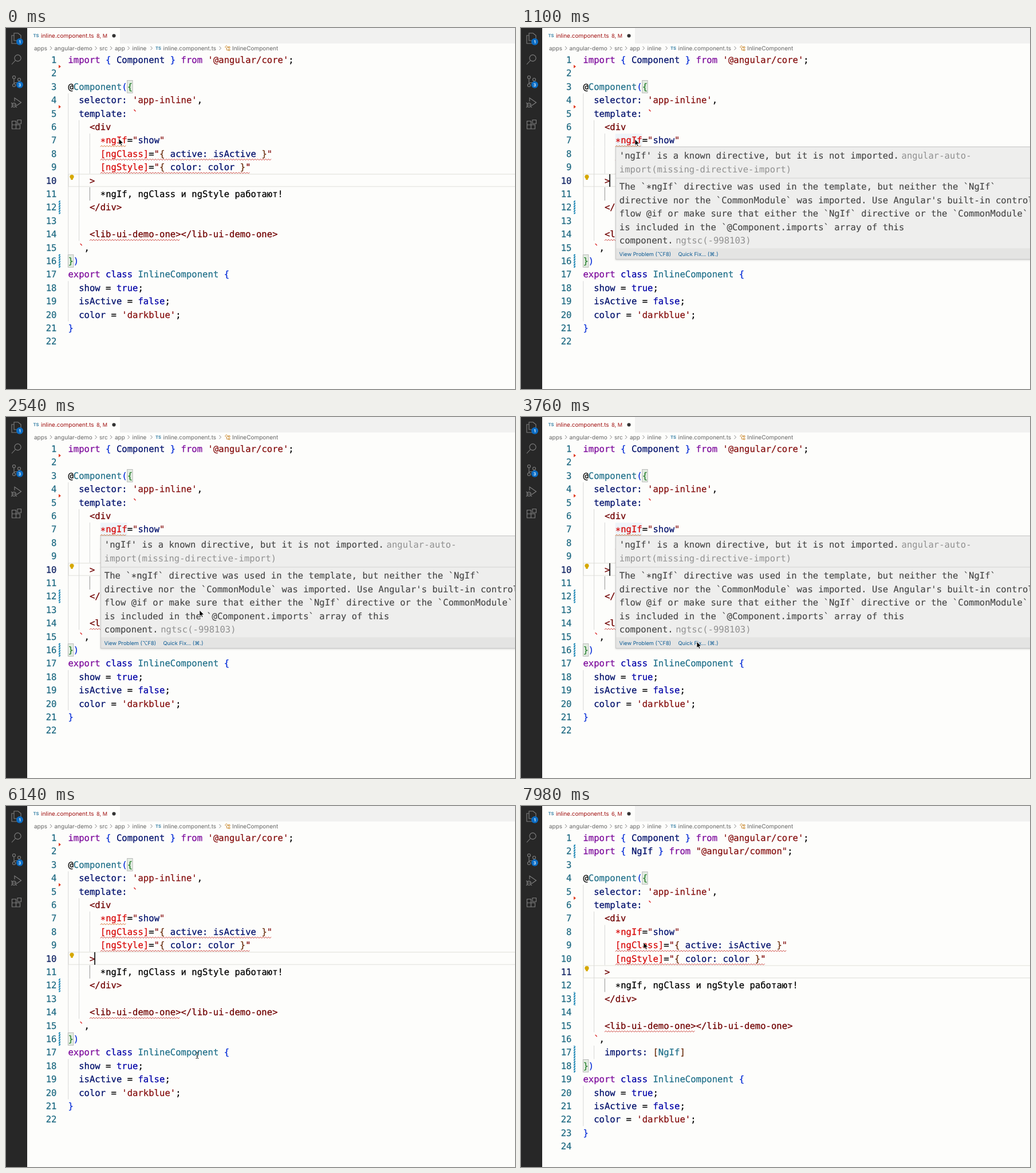
An HTML page that plays this animation: 889x630 px, repeating every 8 s.

```html
<!DOCTYPE html>
<html lang="en">
<head>
<meta charset="utf-8">
<title>Quick fix in a code editor</title>
<style>
  html, body { margin: 0; width: 100%; height: 100%; overflow: hidden; background: #fdfdfb; }
  svg { display: block; width: 100%; height: 100%; }
  text { white-space: pre; text-rendering: geometricPrecision; }
  .code { font: 15.6px "DejaVu Sans Mono", monospace; }
  .code tspan { fill: currentColor; stroke: currentColor; stroke-width: .25; }
  .ui { font: 10px Inter, sans-serif; }
  .k { color: #7d0a9c } .v { color: #00106c } .s { color: #861010 } .t { color: #20708a }
  .b { color: #0a30d8 } .g { color: #2a8030 } .m { color: #700000 } .r { color: #d80a0a }
  .n { color: #0000a8 } .o { color: #6c3010 } .x { color: #000 }
  .num { color: #1e6a82 } .num.now { color: #0b1f60 }
  .icon { fill: none; stroke: #808080; stroke-width: 1.1; }
  .code .dim { color: #909090; stroke: none } .code .doc { color: #444; stroke-width: .12 }
</style>
</head>
<body>
<svg viewBox="0 0 889 630" xml:space="preserve">
  <defs>
    <pattern id="stripes" width="3" height="3" patternUnits="userSpaceOnUse" patternTransform="rotate(-45)">
      <rect width="3" height="2.1" fill="#1b86b4"/>
    </pattern>
    <filter id="shadow" x="-10%" y="-10%" width="120%" height="130%">
      <feDropShadow dx="0" dy="1" stdDeviation="1.8" flood-opacity=".18"/>
    </filter>
    <g id="bulb" fill="#d6a800">
      <circle r="3.6"/><path d="M-1.8 2.3H1.8V5.4H-1.8Z"/>
    </g>
  </defs>

  <rect width="889" height="630" fill="#fdfdfb"/>
  <rect x="37" width="852" height="27" fill="#f1f1f0"/>
  <rect x="37" width="162" height="27" fill="#fdfdfb"/>
  <rect width="37" height="630" fill="#272727"/>

  <g class="icon">
    <path d="M14 9H21L26 13V22H14ZM14 13H10V27H20V22"/>
    <circle cx="20.5" cy="52.5" r="5.6"/><path d="M16.5 56.5L10 63.5"/>
    <circle cx="14" cy="86" r="2.5"/><circle cx="14" cy="100" r="2.5"/><circle cx="23" cy="90" r="2.5"/>
    <path d="M14 88.5V97.5M23 92.5Q23 95.5 19 95.5H16Q14 95.5 14 97.5"/>
    <path d="M15 128V122L26.5 130L18.5 135.5"/><circle cx="14" cy="134.5" r="3.4"/>
    <path d="M10.6 134.5H17.4M9 130.5L11.5 132M9 138.5L11.5 137M19 138.5L16.5 137"/>
    <path d="M10.5 162.5H17.5V176H10.5ZM10.5 169H24.5V176H17.5M20 160.5H26.5V167H20Z"/>
  </g>
  <g fill="#0a6cc4"><circle cx="24" cy="24" r="6"/><circle cx="24" cy="99" r="6"/></g>
  <g class="ui" fill="#fff" text-anchor="middle" style="font-size:7.5px;font-weight:600">
    <text x="24" y="26.8">1</text><text x="24" y="101.8">3</text>
  </g>

  <g class="ui" fill="#a01010">
    <text x="61" y="16.7">inline.component.ts</text>
    <text id="problems" x="158" y="16.7" style="font-size:9.2px"></text>
  </g>
  <circle cx="188.5" cy="13.5" r="3.1" fill="#333"/>
  <g class="ui" fill="#3b83a8" style="font-size:7.6px;font-weight:700">
    <text x="47.5" y="16.2">TS</text><text x="261" y="38.2">TS</text>
  </g>
  <g id="crumbs" class="ui" fill="#666"></g>
  <path d="M382.5 33L385 30.8L387.5 33.2L385 35.5ZM385.5 35V38.5H388.5M387 33.8H388.5M388.5 32.7H391V35H388.5ZM388.5 37.2H391V39.4H388.5Z" fill="none" stroke="#c98528" stroke-width=".9"/>

  <rect id="mark" y="184.5" height="22.5"/>
  <g id="before"></g>
  <g id="after"></g>
  <rect id="caret" x="154.3" width="1.6" height="22" fill="#000"/>

  <g id="hover">
    <rect x="165.5" y="207.5" width="740" height="196" fill="#eeeeed" stroke="#c8c8c8" filter="url(#shadow)"/>
    <rect x="166" y="384.5" width="740" height="18.5" fill="#e4e4e3"/>
    <path d="M166 262H889" stroke="#d2d2d2"/>
    <g id="message" class="code"></g>
    <g class="ui" fill="#0a5a94" style="font-size:9.3px">
      <text x="171.5" y="397.8">View Problem (⌥F8)</text><text x="274.5" y="397.8">Quick Fix... (⌘.)</text>
    </g>
  </g>

  <g id="menu">
    <rect x="275" y="404" width="148" height="45.5" rx="4" fill="#eeeeed" stroke="#c4c4c4" stroke-width=".8" filter="url(#shadow)"/>
    <text class="ui" x="286" y="420.3" fill="#747474" style="font-size:9.4px;font-weight:600">Quick Fix</text>
    <rect x="278.5" y="427.5" width="141" height="18.5" rx="2.5" fill="#0054b4"/>
    <use href="#bulb" x="293" y="435.5"/>
    <text class="ui" x="305" y="440.4" fill="#fff" style="font-size:9.8px;font-weight:500">Import NgIf (Angular)</text>
  </g>

  <g id="pointer">
    <path id="arrow" d="M0 0V11L2.5 8.8L4.2 12.6L6 11.8L4.3 8H7.8Z" fill="#000" stroke="#fff" stroke-width=".8"/>
    <path id="beam" d="M-2.5 -5.5Q0 -5.5 0 -4Q0 -5.5 2.5 -5.5M0 -4V4M-2.5 5.5Q0 5.5 0 4Q0 5.5 2.5 5.5M-1.5 1.5H1.5" fill="none" stroke="#222"/>
  </g>
</svg>
<script>
const $ = id => document.getElementById(id);
const CHAR = 9.392, LEFT = 108.4, ROW = 23.4;
const colX = col => LEFT + col * CHAR;
const rowY = row => 55.5 + (row - 1) * ROW;

// Tokens are separated by "~"; the first letter of each is its colour class.
const before = [
  "kimport~b { ~vComponent~b } ~kfrom~s '@angular/core'~x;",
  "",
  "x@~tComponent~b(~g{",
  "v  selector: ~s'app-inline'~x,",
  "v  template: ~r`",
  "m    <div",
  "r      *ngIf~x=~s\"~vshow~s\"",
  "r      [ngClass]~x=~s\"~o{ ~vactive: isActive ~o}~s\"",
  "r      [ngStyle]~x=~s\"~o{ ~vcolor: color ~o}~s\"",
  "m    >",
  "x      *ngIf, ngClass и ngStyle работают!",
  "m    </div>",
  "",
  "m    <lib-ui-demo-one></lib-ui-demo-one>",
  "r  `~x,",
  "g}~b)",
  "kexport ~nclass ~tInlineComponent ~b{",
  "v  show ~x= ~ntrue~x;",
  "v  isActive ~x= ~nfalse~x;",
  "v  color ~x= ~s'darkblue'~x;",
  "b}",
  ""
];
const after = [...before];
after.splice(1, 0, "kimport~b { ~vNgIf~b } ~kfrom~s \"@angular/common\"~x;");
after.splice(16, 0, "v    imports: ~o[~tNgIf~o]");

const escapeText = s => s.replace(/&/g, "&amp;").replace(/</g, "&lt;");
// The asterisk sits at mid-height.
const glyphs = s => escapeText(s).replace(/\*(.)/, '<tspan dy="2.3">*</tspan><tspan dy="-2.3">$1</tspan>');
const tokens = line => line.split("~").filter(Boolean)
  .map(p => `<tspan class="${p[0]}">${glyphs(p.slice(1))}</tspan>`).join("");
const plain = line => line.split("~").map(p => p.slice(1)).join("");

function squiggle(row, col, length, color, cls = "") {
  const y = rowY(row) + 10.3, end = colX(col + length);
  let d = "", up = false;
  for (let x = colX(col); x <= end; x += 2.35, up = !up)
    d += `${d ? "L" : "M"}${x.toFixed(2)} ${(y + (up ? -1 : 1)).toFixed(2)}`;
  return `<path class="${cls}" d="${d}" fill="none" stroke="${color}" stroke-width=".9"/>`;
}

function bracketBox(row, col) {
  return `<rect x="${colX(col)}" y="${rowY(row) - 10.8}" width="${CHAR}" height="21.8" fill="#e3ede2" stroke="#b9b9b9"/>`;
}

function buildEditor(lines, changedRows, deletedBelow) {
  const texts = lines.map(plain);
  const indent = i => texts[i] ? texts[i].search(/\S/)
    : Math.min(...[i - 1, i + 1].map(j => texts[j] ? texts[j].search(/\S/) : 0));
  let out = "";
  texts.forEach((text, i) => {
    const row = i + 1, y = rowY(row), current = text === "    >";
    if (current) out += `<rect x="109" y="${y - 11}" width="800" height="21.5" fill="none" stroke="#e9e9e4" stroke-width="1.5"/>`;
    for (let col = 0; col < indent(i); col += 2) {
      const active = col === 4 && text.includes("ngStyle р");
      out += `<path d="M${colX(col) + .4} ${y - ROW / 2}v${ROW}" stroke="${active ? "#939393" : "#d6d6d6"}"/>`;
    }
    if (text.endsWith("({")) out += bracketBox(row, text.length - 1);
    if (text.startsWith("})")) out += bracketBox(row, 0);
    out += `<text class="code" x="${LEFT}" y="${y + 5.5}">${tokens(lines[i])}</text>`;
    out += `<text class="code" x="88.5" y="${y + 5.5}" text-anchor="end"><tspan class="num${current ? " now" : ""}">${row}</tspan></text>`;
    const error = text.match(/\[ng\w+\]=.*|<lib-ui-demo-one>/);
    if (error) out += squiggle(row, error.index, error[0].length, "#c8302a");
    if (text.includes("*ngIf=")) out += squiggle(row, 6, 5, "#d6641e", "missing");
    if (current) out += `<use href="#bulb" x="115" y="${y - 6.6}"/>`;
  });
  for (const row of changedRows)
    out += `<rect x="92" y="${rowY(row) - ROW / 2}" width="3" height="${ROW}" fill="url(#stripes)"/>`;
  for (const row of deletedBelow)
    out += `<path d="M92 ${rowY(row + .5) - 3}l4 3l-4 3z" fill="#e03a1e"/>`;
  return out;
}

$("before").innerHTML = buildEditor(before, [12, 16], [1, 4]);
$("after").innerHTML = buildEditor(after, [2, 13, 17, 18], [5]);

$("crumbs").innerHTML =
  [[49, "apps"], [84.5, "angular-demo"], [163, "src"], [190, "app"], [220.5, "inline"],
   [274.5, "inline.component.ts"], [395, "InlineComponent"]]
    .map(([x, s]) => `<text x="${x}" y="38.7">${s}</text>`).join("") +
  [77, 155.5, 182, 212.5, 252.5, 372.5]
    .map(x => `<path d="M${x} 32l3 3.2l-3 3.2" fill="none" stroke="#858585"/>`).join("");

$("message").innerHTML = [
  [223, "'ngIf' is a known directive, but it is not imported.", "angular-auto-"],
  [246.4, "", "import(missing-directive-import)"],
  [277, "The `*ngIf` directive was used in the template, but neither the `NgIf`"],
  [300.4, "directive nor the `CommonModule` was imported. Use Angular's built-in control"],
  [323.8, "flow @if or make sure that either the `NgIf` directive or the `CommonModule`"],
  [347.2, "is included in the `@Component.imports` array of this"],
  [370.6, "component.", "ngtsc(-998103)"]
].map(([y, doc, dim = ""]) =>
  `<text x="171.8" y="${y + 5.3}"><tspan class="doc">${glyphs(doc)}</tspan><tspan class="dim" dx="${doc ? 4.5 : 0}">${dim}</tspan></text>`
).join("");

const LOOP = 8000, HOVER = 420, MENU = 4400, CHOSEN = 5680, EDIT = 6350, CHECKED = 7100;
const path = [
  [0, 197, 193], [500, 199, 194], [1600, 199, 194], [2350, 338, 337], [2650, 338, 337],
  [3300, 307, 392], [4350, 307, 392], [4750, 317, 408], [4950, 317, 408],
  [5400, 334, 435], [6750, 334, 435], [7500, 214, 238], [LOOP, 214, 238]
];

function pointerAt(t) {
  const i = path.findIndex(p => p[0] > t);
  const [t0, x0, y0] = path[i - 1], [t1, x1, y1] = path[i];
  const u = (t - t0) / (t1 - t0), e = u * u * (3 - 2 * u);
  return [x0 + (x1 - x0) * e, y0 + (y1 - y0) * e];
}

function caretOn(t) {
  if (t < 680 || (t >= MENU && t < CHOSEN)) return false;
  const start = t >= EDIT ? EDIT : t >= CHOSEN ? CHOSEN : 680;
  return Math.floor((t - start) / 500) % 2 === 0;
}

function highlight(col, length, color) {
  $("mark").setAttribute("x", colX(col));
  $("mark").setAttribute("width", length * CHAR);
  $("mark").setAttribute("fill", color);
}

const show = (el, on) => { el.style.display = on ? "" : "none"; };
const staleSquiggle = $("after").querySelector(".missing");

function render(t) {
  const edited = t >= EDIT, hovering = t >= HOVER && t < MENU, choosing = t >= MENU && t < CHOSEN;
  const beam = t >= CHOSEN && t < 6850;
  show($("before"), !edited);
  show($("after"), edited);
  show($("hover"), hovering);
  show($("menu"), choosing);
  show($("mark"), hovering || choosing);
  if (choosing) highlight(7, 4, "#f7bca4");
  else highlight(6, 5, "#eef4f9");
  show(staleSquiggle, t < CHECKED);
  $("problems").textContent = t < CHECKED ? "8, M" : "6, M";
  show($("caret"), caretOn(t));
  $("caret").setAttribute("y", rowY(edited ? 11 : 10) - 11);
  show($("arrow"), !beam);
  show($("beam"), beam);
  $("pointer").setAttribute("transform", `translate(${pointerAt(t)})`);
}

const startTime = performance.now();
function frame() {
  render((performance.now() - startTime) % LOOP);
  requestAnimationFrame(frame);
}
frame();
</script>
</body>
</html>
```
